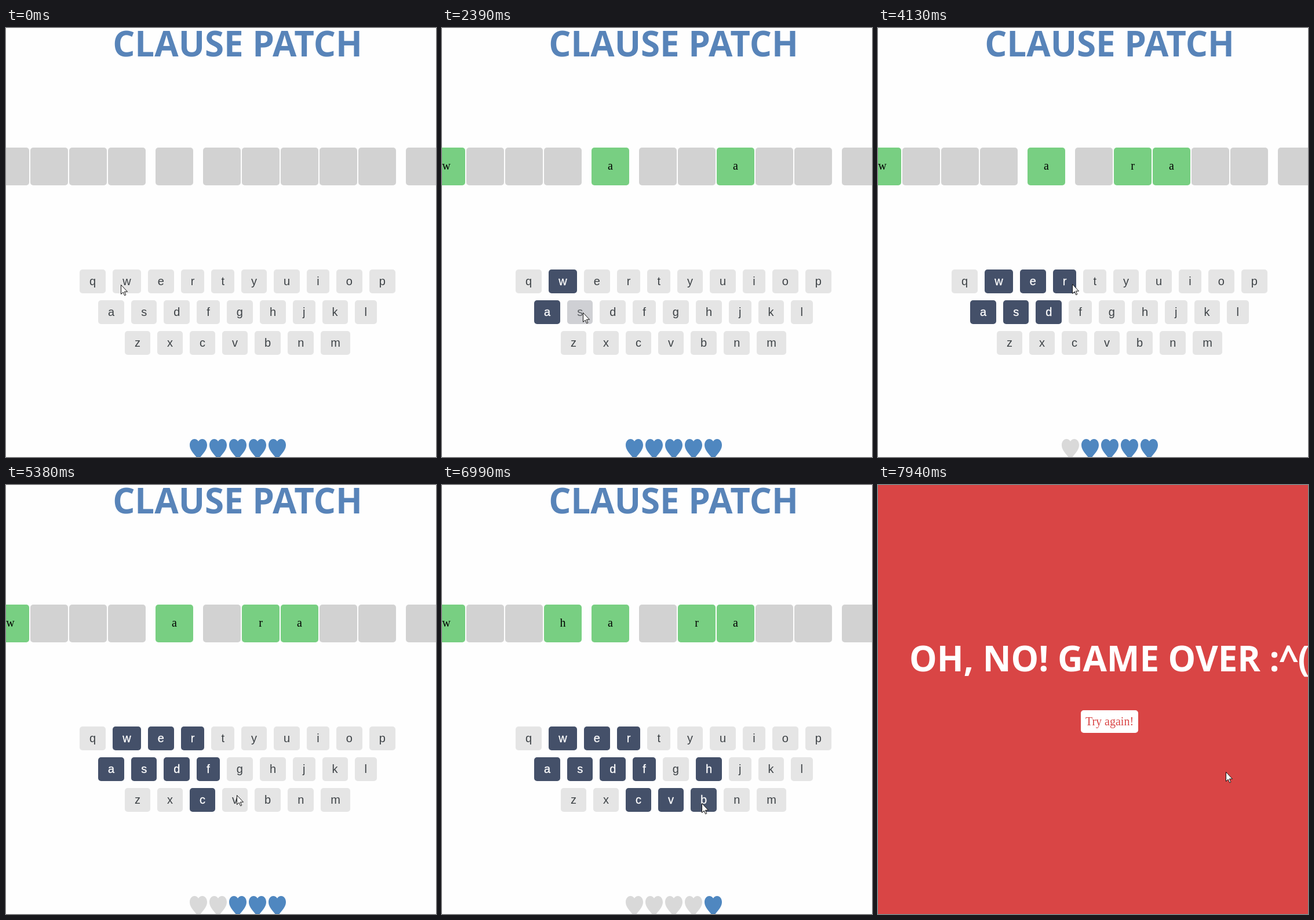
These frames come from a looping animation (742 by 739 pixels, 7990 ms). An HTML page:

```html
<!DOCTYPE html>
<html lang="en">
<head>
<meta charset="utf-8">
<title>Clause Patch</title>
<style>
html, body { margin: 0; width: 100%; height: 100%; overflow: hidden; background: #fefefe; }
#stage { position: absolute; left: 0; top: 0; width: 742px; height: 739px; overflow: hidden; }
svg { position: absolute; left: 0; top: 0; overflow: visible; }
.big { font: 700 60px "Open Sans", sans-serif; text-anchor: middle; }
.tile {
  position: absolute; top: 206px; width: 65px; height: 65px; border-radius: 5px;
  font: 20px/63px "Liberation Serif", serif; text-align: center; color: #000;
}
.row { position: absolute; left: 0; width: 799px; display: flex; justify-content: center; gap: 12px; }
.key {
  height: 41px; padding: 0 17px; border-radius: 5px;
  font: 20px/41px "Liberation Sans", sans-serif;
}
.key.down { outline: 2px solid #8fabdc; outline-offset: -1px; border-radius: 0; }
#over { position: absolute; inset: 0; background: #d94545; }
#retry {
  position: absolute; left: 350px; top: 388px; width: 99px; height: 39px; border-radius: 5px;
  background: #fff; color: #d94545; text-align: center; white-space: nowrap;
  font: 20px/39px "Liberation Serif", serif;
}
</style>
</head>
<body>
<div id="stage">
  <svg id="board" width="742" height="739">
    <text class="big" x="399.5" y="49" fill="#5884b9">CLAUSE PATCH</text>
  </svg>
  <div id="over">
    <svg width="742" height="739">
      <text class="big" x="399.5" y="321" fill="#fff">OH, NO! GAME OVER :^(</text>
    </svg>
    <div id="retry">Try again!</div>
  </div>
  <svg id="cursor" width="13" height="20">
    <path d="M.5 .5V16.5L4.2 13.1 6.6 18.7 8.8 17.8 6.4 12.2H11.5Z" fill="#fff" stroke="#111" stroke-width="1"/>
  </svg>
</div>
<script>
const LOOP = 7990, FADE = 150, END = 7630;

// letter: [pressed, released]
const presses = {
  w: [290, 370], a: [1320, 1390], s: [2275, 2356], d: [2910, 2990],
  e: [3390, 3475], r: [3890, 3960], f: [4660, 4740], c: [5130, 5200],
  v: [5430, 5510], h: [6370, 6440], b: [6800, 6855], n: [7190, 7260], m: [7560, END]
};
const misses = ["d", "c", "v", "b", "m"];

// cursor stops: [leave, arrive, x, y]
const moves = [
  [0, 60, 202, 442], [830, 1290, 183, 491], [1730, 2240, 243, 490],
  [2690, 2880, 297, 490], [3080, 3350, 273, 443], [3600, 3860, 335, 441],
  [4310, 4600, 358, 491], [4850, 5100, 345, 544], [5220, 5380, 398, 534],
  [5720, 5990, 425, 470], [5990, 6300, 463, 496], [6600, 6790, 446, 548],
  [6970, 7160, 508, 544], [7370, 7540, 565, 538], [7700, 7860, 608, 499],
  [7860, 7940, 600, 494]
];

const $ = id => document.getElementById(id);
const stage = $("stage"), board = $("board"), over = $("over"), cursor = $("cursor");

function add(parent, cls, text = "") {
  const el = document.createElement("div");
  el.className = cls;
  el.textContent = text;
  parent.insertBefore(el, parent === stage ? over : null);
  return el;
}

// phrase tiles; dots stay hidden
const tiles = [];
let left = -25;
for (const ch of "w..h a .ra.n .") {
  if (ch === " ") { left += 15; continue; }
  const el = add(stage, "tile");
  el.style.left = left + "px";
  tiles.push({ el, ch });
  left += 67;
}

const keys = [];
["qwertyuiop", "asdfghjkl", "zxcvbnm"].forEach((letters, i) => {
  const row = add(stage, "row");
  row.style.top = 416 + 53 * i + "px";
  for (const ch of letters) keys.push({ el: add(row, "key", ch), ch });
});

const hearts = misses.map((ch, i) => {
  const el = document.createElementNS("http://www.w3.org/2000/svg", "path");
  el.setAttribute("d", "M15 35L12.8 32.5C5.1 23.6 0 17.7 0 10.5C0 4.6 3.6 0 8.2 0C10.9 0 13.4 1.5 15 4" +
    "C16.6 1.5 19.1 0 21.8 0C26.4 0 30 4.6 30 10.5C30 17.7 24.9 23.6 17.2 32.5Z");
  el.setAttribute("transform", `translate(${317 + 34 * i} 708)`);
  board.append(el);
  return { el, ch };
});

const ease = u => {
  u = Math.min(1, Math.max(0, u));
  return u * u * (3 - 2 * u);
};
const mix = (a, b, k) => `rgb(${a.map((v, i) => Math.round(v + (b[i] - v) * k))})`;
const guessed = (ch, t) => ch in presses && t >= presses[ch][1];

function cursorAt(t) {
  let x = 198, y = 442;
  for (const [from, to, nx, ny] of moves) {
    if (t < from) break;
    const k = ease((t - from) / (to - from));
    x += (nx - x) * k;
    y += (ny - y) * k;
  }
  return [Math.round(x), Math.round(y)];
}

function draw(t) {
  for (const { el, ch } of tiles) {
    const open = guessed(ch, t);
    el.textContent = open ? ch : "";
    el.style.background = open ? "#78cf82" : "#d2d2d2";
  }
  for (const { el, ch } of keys) {
    const [down, up] = presses[ch] || [LOOP, LOOP];
    const k = ease((t - up) / FADE);
    el.style.background = mix([229, 229, 229], [68, 80, 105], k);
    el.style.color = mix([61, 66, 70], [255, 255, 255], k);
    el.style.webkitTextStroke = k > 0.5 ? "0.3px" : "0";
    el.classList.toggle("down", t >= down && t < up);
  }
  for (const { el, ch } of hearts) el.setAttribute("fill", guessed(ch, t) ? "#d9d9d9" : "#4f87c0");
  over.style.display = t >= END ? "block" : "none";
  const [x, y] = cursorAt(t);
  cursor.style.transform = `translate(${x}px, ${y}px)`;
}

const start = performance.now();
function tick() {
  draw((performance.now() - start) % LOOP);
  requestAnimationFrame(tick);
}
tick();
</script>
</body>
</html>
```
